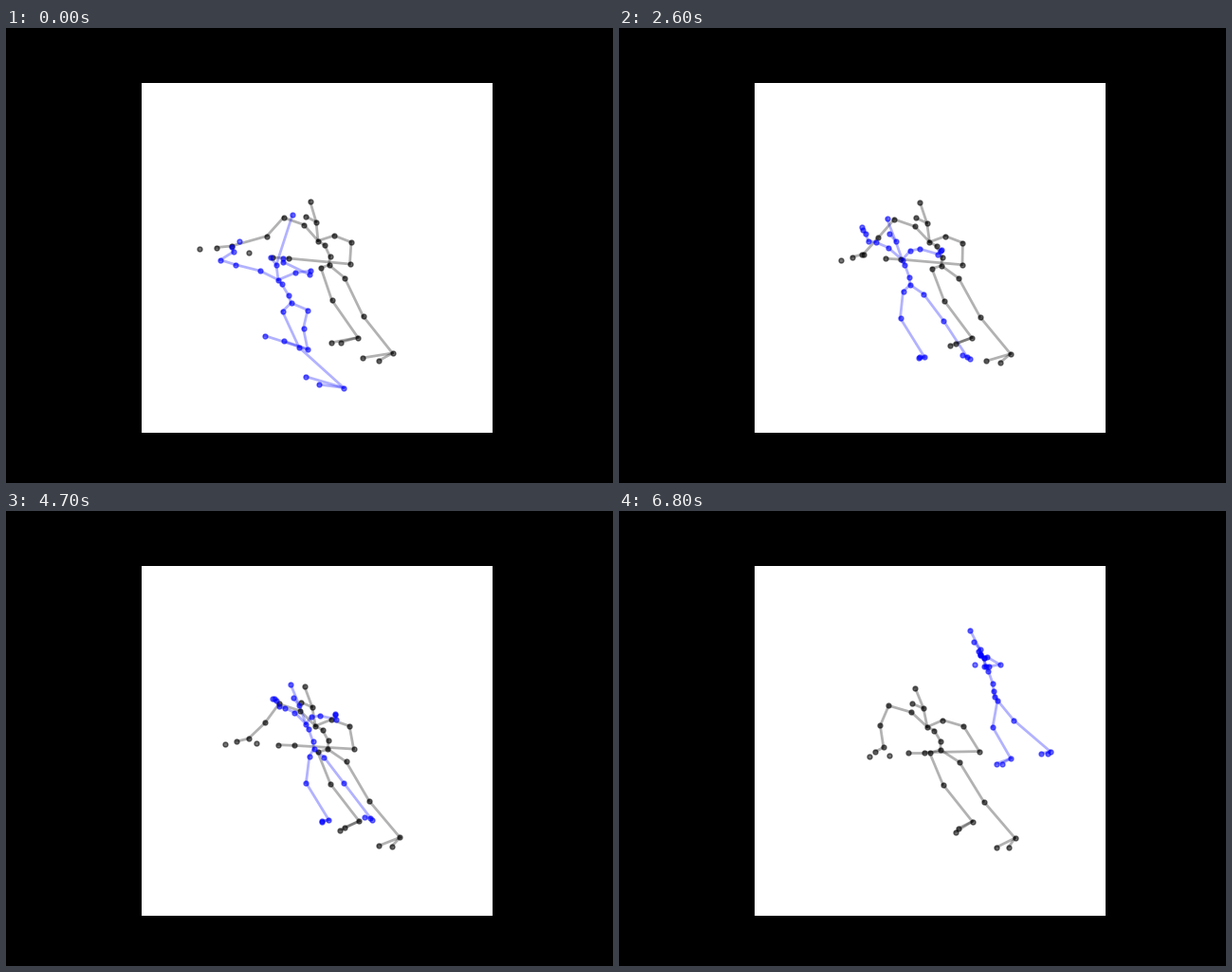
A matplotlib script that plays this animation: 640 px wide and 480 px high, repeating every 6900 ms.

```python
import matplotlib.pyplot as plt
import numpy as np
from matplotlib.animation import FuncAnimation
from matplotlib.collections import LineCollection
from matplotlib.patches import Rectangle

FRAMES, STEP = 69, 100
W, H, DPI = 640, 480, 100

t = np.arange(FRAMES)
u = t / (FRAMES - 1)


def blend(w):
    """Weights of a two-pose mix."""
    return np.array([1 - w, w])


def curve(keys, points):
    """Smooth path through a few complex key points."""
    k, p = np.array(keys, float), np.array(points)
    m = np.gradient(p, k)
    i = np.clip(np.searchsorted(k, t, side="right") - 1, 0, len(k) - 2)
    h = k[i + 1] - k[i]
    s = (t - k[i]) / h
    ease = s * s * (3 - 2 * s)
    return (p[i] * (1 - ease) + p[i + 1] * ease
            + h * s * (1 - s) * (m[i] * (1 - s) - m[i + 1] * s))


class Dancer:
    """Joint tree: each joint hangs at a complex offset (x + yj) from its parent."""

    def __init__(self, ax, color, root):
        self.joints = {"pelvis": root}
        self.bones = []
        self.lines = LineCollection([], colors=color, alpha=0.3, linewidths=2,
                                    capstyle="projecting", zorder=2)
        self.dots = ax.scatter([], [], s=13, c=color, alpha=0.55,
                               linewidths=1, zorder=3)
        ax.add_collection(self.lines)

    def limb(self, parent, names, *poses, mix=None, turn=0, joined=True):
        """Chain of joints whose offsets are mixed from one or more poses."""
        weights = np.ones((1, FRAMES)) if mix is None else mix
        offsets = np.array(poses).T @ weights * np.exp(1j * turn)
        for name, offset in zip(names.split(), offsets):
            self.joints[name] = self.joints[parent] + offset
            if joined:
                self.bones.append((parent, name))
            parent = name

    def pose(self, frame):
        at = {n: (z[frame].real, z[frame].imag) for n, z in self.joints.items()}
        self.dots.set_offsets(list(at.values()))
        self.lines.set_segments([(at[a], at[b]) for a, b in self.bones])
        return self.lines, self.dots


fig = plt.figure(figsize=(W / DPI, H / DPI), dpi=DPI, facecolor="black")
ax = fig.add_axes([0, 0, 1, 1])
ax.set(xlim=(0, W), ylim=(H, 0))
ax.axis("off")
ax.add_patch(Rectangle((143.2, 57.6), 369.6, 369.6, color="white", lw=0))

# Leading dancer: leans back slowly, feet settle early, arms drop late.
lean = -0.1 * u
settle = blend(u ** 0.7)
drop = blend(u ** 3)
sway = blend(u + 0.22 * np.sin(2 * np.pi * u))

dark = Dancer(ax, "black", 340.5 + 250j + u * (-1.5 + 2j))
dark.limb("pelvis", "waist chest neck head crown",
          [1 - 9j, -5.5 - 12j, -7 - 4.5j, -2 - 20j, -6.5 - 22j], turn=lean)
dark.limb("head", "nose", [-11.5 - 6j], turn=lean)
dark.limb("neck", "collar_l", [-15 - 17j], turn=lean)
dark.limb("neck", "collar_r", [17 - 5.5j], turn=lean)

dark.limb("collar_l", "shoulder_l elbow_l",
          [-21.5 - 7.5j, -17.5 + 19.5j], [-24 - 7j, -9 + 21j], mix=drop)
dark.limb("elbow_l", "wrist_l hand_l",
          [-37 + 10.5j, -16 + 1.5j], [3.5 + 23j, -8.5 + 4.5j], mix=sway)
dark.limb("hand_l", "tip_l", [-18 + 1j], [-6.5 + 5j], mix=sway, joined=False)
dark.limb("elbow_l", "thumb_l", [-19 + 17j], [10 + 31.5j], mix=drop, joined=False)
dark.limb("collar_r", "shoulder_r elbow_r wrist_r hand_r",
          [18 + 7j, -1.5 + 23j, -65 - 6j, -16.5 - 1j],
          [22 + 6.5j, 16.5 + 26.5j, -58 + 1j, -17 + 0j], mix=drop)

dark.limb("pelvis", "hip_l knee_l ankle_l heel_l",
          [-8.5 + 3j, 11.5 + 34j, 27.5 + 39.5j, -18 + 5j],
          [-11.5 + 3j, 14 + 33.5j, 31 + 39j, -15 + 7.5j], mix=settle)
dark.limb("ankle_l", "toe_l", [-28.5 + 5.5j], [-17.5 + 11j], mix=settle)
dark.limb("pelvis", "hip_r knee_r ankle_r heel_r",
          [16.5 + 13.5j, 19.5 + 40.5j, 31 + 39j, -14.5 + 8j],
          [20 + 13j, 25.5 + 41.5j, 33 + 38.5j, -7 + 10j], mix=settle)
dark.limb("ankle_r", "toe_r", [-31.5 + 5j], [-20 + 10j], mix=settle)

# Second dancer: crouch, stride, then a turn while rising to the right.
s = np.clip(1 - t / 18, 0, 1)
crouch = s * s * (3 - 2 * s)
turned = np.clip((t - 26) / 42, 0, 1) ** 2
act = np.array([crouch, 1 - crouch - turned, turned])

blue = Dancer(ax, "blue", curve(
    [0, 26, 47, 60, 68],
    [300.5 + 290j, 307 + 271j, 324.5 + 251j, 352.5 + 226.5j, 395 + 190j]))
blue.limb("pelvis", "waist chest neck",
          [-1 - 8.3j, -4.7 - 13.2j, -2.7 - 5j], turn=-0.2 * crouch)
blue.limb("neck", "head crown",
          [-2 - 16j, 17 - 52.5j], [-7 - 19.7j, -9 - 23.5j],
          [-6 - 17.5j, -10.5 - 20.5j], mix=act)
blue.limb("head", "nose", [-6.5 - 8j])

blue.limb("neck", "collar_l shoulder_l elbow_l wrist_l hand_l",
          [-19 - 9.5j, -26 - 6.5j, -16 - 5j, 13.5 - 8.5j, -1.5 - 5j],
          [-15 - 13j, -13 - 5.5j, -8 - 1.5j, -2.5 - 8j, -3.5 - 3.5j],
          [-1.5 - 8.5j, -4.5 - 3j, 0 - 1j, -2 - 3j, 2 + 3.5j], mix=act)
blue.limb("hand_l", "tip_l", [7.5 - 6j], [-0.5 - 3.5j], [-6 + 10.5j],
          mix=act, joined=False)
blue.limb("neck", "collar_r shoulder_r elbow_r wrist_r hand_r",
          [18 - 7.5j, 16 - 2j, -1 + 4j, -28 - 13.5j, 0 - 3.5j],
          [8.5 - 9.5j, 10 - 2j, 19 + 5.5j, 3 - 3.5j, 1 - 1.5j],
          [-2 + 0j, 5.5 + 0.5j, 11.5 - 2j, -13.5 - 8j, -3 + 1j], mix=act)

blue.limb("pelvis", "hip_l knee_l ankle_l heel_l",
          [-9 + 9j, 17.5 + 38j, 47 + 42.5j, -26.5 - 3.5j],
          [-7.5 + 7j, -3 + 28j, 25.5 + 41j, -6 + 1j],
          [4 + 10j, -5 + 28j, 19 + 33j, -9.5 + 5.5j], mix=act)
blue.limb("ankle_l", "toe_l", [-40.5 - 12j], [-5 + 0j], [-15 + 5.5j], mix=act)
blue.limb("pelvis", "hip_r knee_r ankle_r heel_r",
          [17.5 + 7.5j, -4.5 + 19.5j, 4.5 + 22j, -25.5 - 9j],
          [14 + 9.5j, 21 + 28j, 25 + 38.5j, 3 + 1.5j],
          [1 + 6j, 20 + 24.5j, 38.5 + 33j, -3 + 2.5j], mix=act)
blue.limb("ankle_r", "toe_r", [-45.5 - 14.5j], [-5 - 2j], [-9.5 + 2.5j], mix=act)


def draw(frame):
    return dark.pose(frame) + blue.pose(frame)


anim = FuncAnimation(fig, draw, frames=FRAMES, interval=STEP,
                     init_func=lambda: draw(0), repeat=True, repeat_delay=0)
plt.show()
```
